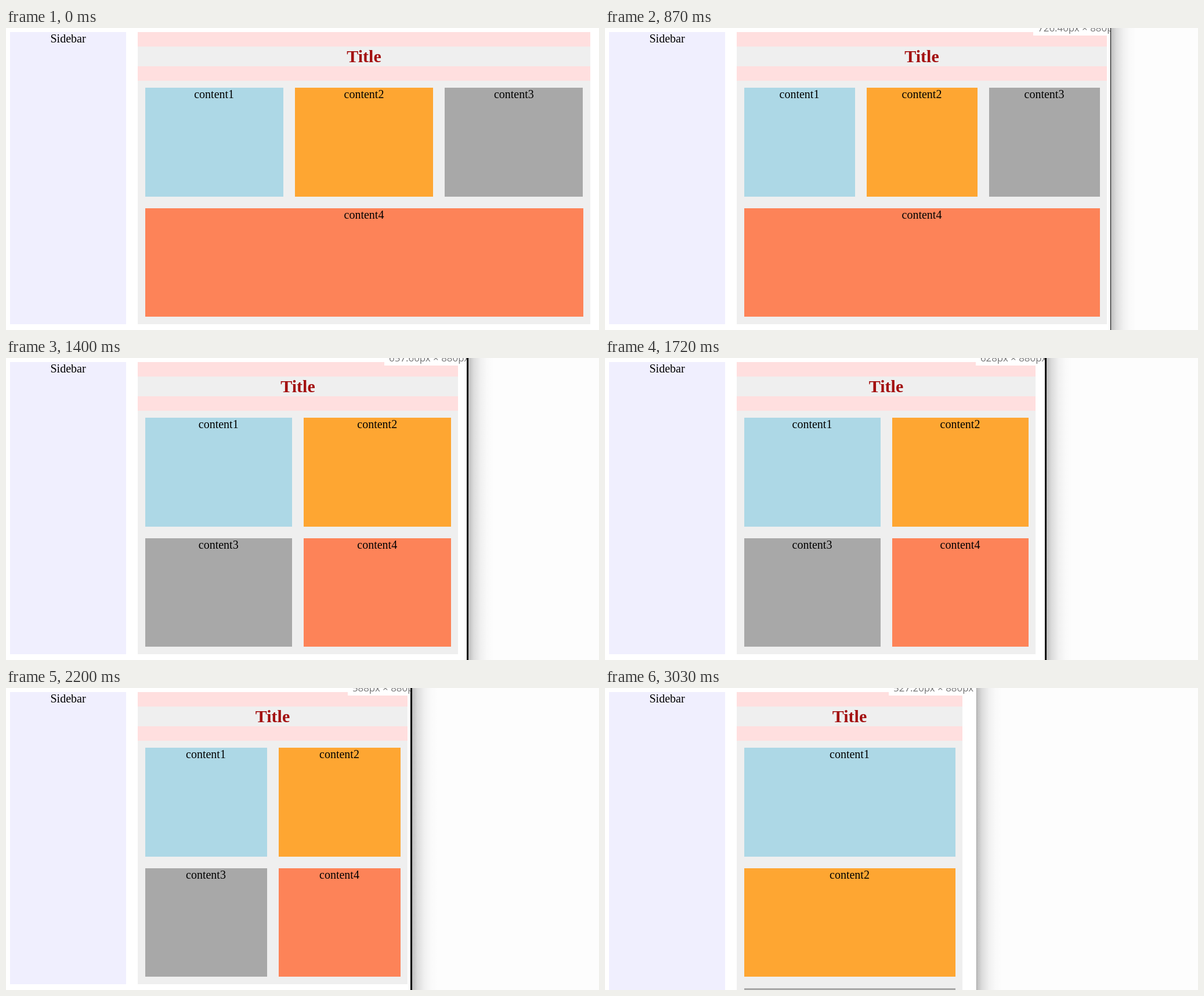
These frames come from a looping animation (1022 px wide and 521 px high, 3.1 s). An HTML page:

```html
<!DOCTYPE html>
<html lang="en">
<head>
<meta charset="utf-8">
<title>Responsive layout</title>
<style>
  * { box-sizing: border-box; }
  html, body {
    margin: 0;
    width: 100%;
    height: 100%;
    overflow: hidden;
    background: #fff;
  }
  body {
    position: relative;
    font: 20px/23px "Liberation Serif", "Times New Roman", serif;
    text-align: center;
    color: #000;
  }
  #win {
    position: absolute;
    inset: 0 auto 0 0;
    overflow: hidden;
    background: #fff;
  }
  #page {
    position: absolute;
    left: 7px;
    top: 7px;
    display: flex;
    gap: 20px;
  }
  aside { flex: none; width: 200px; background: #f0effe; }
  main { flex: 1; min-width: 0; background: #efefef; }
  h1 {
    margin: 0;
    height: 84px;
    border: solid #ffdfdf;
    border-width: 25px 0;
    font-size: 30px;
    line-height: 34px;
    color: #a31010;
  }
  #cards {
    display: flex;
    flex-wrap: wrap;
    gap: 20px;
    padding: 12px 12.5px 12.5px;
  }
  #cards div { flex: 1 1 187.5px; height: 187.5px; }
  #label {
    position: absolute;
    top: -20px;
    height: 33px;
    padding: 0 5px 0 8px;
    background: #fff;
    font: 16.9px/33px "Open Sans", "Noto Sans", sans-serif;
    white-space: nowrap;
    color: #757575;
  }
  #label span { position: relative; top: 3px; }
  #edge { position: absolute; top: 0; bottom: 0; }
  #shade {
    position: absolute;
    inset: 0 0 0 auto;
    background: #fdfdfd linear-gradient(90deg,
      rgba(0,0,0,.25), rgba(0,0,0,.13) 9px, rgba(0,0,0,.05) 21px,
      rgba(0,0,0,.015) 32px, rgba(0,0,0,0) 44px);
  }
</style>
</head>
<body>
<div id="win">
  <div id="page">
    <aside>Sidebar</aside>
    <main>
      <h1>Title</h1>
      <div id="cards">
        <div style="background:#add8e6">content1</div>
        <div style="background:#fea632">content2</div>
        <div style="background:#a8a8a8">content3</div>
        <div style="background:#fd8358">content4</div>
      </div>
    </main>
  </div>
  <div id="label"><span></span></div>
</div>
<div id="shade"></div>
<div id="edge"></div>
<script>
const LOOP = 3100, STAGE = 1022, TICK = 66;
const $ = id => document.getElementById(id);
const win = $('win'), page = $('page'), label = $('label');
const edge = $('edge'), shade = $('shade');

const runs = [330, 870, 1400, 1930, 2490, 3030];

// [tick, x]: right side of the content, and of the dragged window
const bodyPath = [[0, 990], [3, 922], [7, 880], [9, 850], [12, 806], [15, 786],
  [21, 742], [23, 734], [28, 692], [31, 668], [34, 650], [39, 618], [40, 616]];
const winPath = [[0, 1016], [3, 939], [7, 883], [12, 822], [15, 801], [21, 758],
  [23, 743], [28, 697], [31, 679], [34, 662], [39, 641], [40, 640]];

function at(path, k) {
  const i = Math.max(1, path.findIndex(p => p[0] >= k));
  const [k0, x0] = path[i - 1], [k1, x1] = path[i];
  return Math.round(x0 + (x1 - x0) * (k - k0) / (k1 - k0));
}

function tickAt(t) {
  const r = runs.filter(s => s <= t).length - 1;
  if (r < 0) return -1;
  const step = Math.min(7, Math.floor((t - runs[r] + 12) / TICK));
  return Math.min(40, r * 8 + step);
}

function draw(k) {
  const idle = k < 0;
  const right = idle ? 1007 : at(bodyPath, k);
  const end = idle ? STAGE : at(winPath, k);
  const line = k > 30 || (k > 7 && k < 16) ? 1 : 3;

  win.style.width = end + 'px';
  page.style.width = right - 7 + 'px';

  label.hidden = edge.hidden = shade.hidden = idle;
  if (idle) return;

  const size = (right + 43) / 1.25;
  const text = Number.isInteger(size) ? size : size.toFixed(2);
  label.firstChild.textContent = text + 'px × 880px';
  label.style.right = end - right - 24 + 'px';

  edge.style.left = end + 'px';
  edge.style.width = line + 'px';
  edge.style.background = k > 30 ? '#a6a6a6' : '#000';
  shade.style.left = end + line + 'px';
}

let last;
function frame() {
  const k = tickAt(performance.now() % LOOP);
  if (k !== last) draw(last = k);
  requestAnimationFrame(frame);
}
frame();
</script>
</body>
</html>
```
